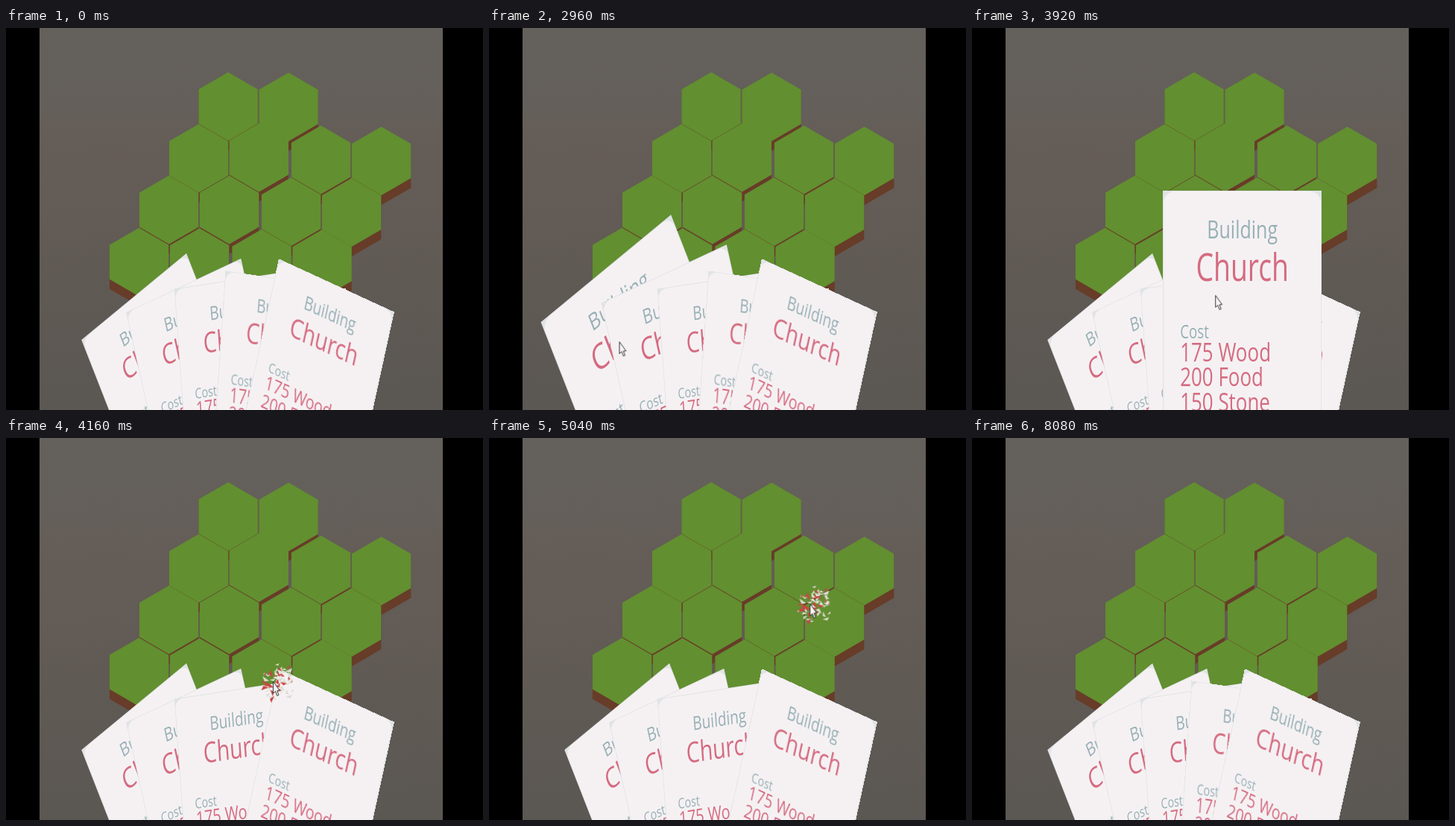
Write an HTML page that moves like this. It is 640 by 512 pixels and loops after 8160 ms.

```html
<!DOCTYPE html>
<html lang="en">
<head>
<meta charset="utf-8">
<title>Card hand over a hex board</title>
<style>
  html, body { margin: 0; width: 100%; height: 100%; overflow: hidden; background: #000; }
  svg { display: block; width: 640px; height: 512px; }
  text { font-family: "Open Sans", "Noto Sans", sans-serif; }
  .label { fill: #97b0b5; }
  .value { fill: #d56b80; }

  .c1, .c2, .c3, .c4, #carry, #arrow, #drag, #church { animation: 8160ms linear infinite; }
  .c1 { animation-name: hover1; }
  .c2 { animation-name: hover2; }
  .c3 { animation-name: hover3; }
  .c4 { animation-name: hover4, away; animation-timing-function: linear, step-end; }
  #carry { animation-name: path; }
  #arrow { animation-name: pointer; animation-timing-function: step-end; }
  #drag { animation-name: drag; animation-timing-function: step-end; }
  #church { animation-name: place; animation-timing-function: step-end; }

  @keyframes hover1 {
    0%, 33% { scale: 1; } 34.3%, 36% { scale: 1.315; } 37.2%, 100% { scale: 1; }
  }
  @keyframes hover2 {
    0%, 36% { scale: 1; } 37%, 38% { scale: 1.315; } 39.1%, 80% { scale: 1; }
    80.6% { scale: 1.315; } 81.3%, 100% { scale: 1; }
  }
  @keyframes hover3 {
    0%, 38% { scale: 1; } 39.2%, 46.3% { scale: 1.315; } 47.1%, 77% { scale: 1; }
    77.8%, 80% { scale: 1.315; } 80.7%, 100% { scale: 1; }
  }
  @keyframes hover4 {
    0%, 46.3% { scale: 1; } 47.1%, 48% { scale: 1.315; } 48.1%, 100% { scale: 1; }
  }
  @keyframes away { 0% { opacity: 1; } 48% { opacity: 0; } 72.5%, 100% { opacity: 1; } }
  @keyframes drag { 0% { opacity: 0; } 48% { opacity: 1; } 50.95%, 100% { opacity: 0; } }
  @keyframes place { 0% { opacity: 0; } 50.95% { opacity: 1; } 72.5%, 100% { opacity: 0; } }
  @keyframes pointer {
    0% { opacity: 0; } 26.45% { opacity: 1; } 27.4% { opacity: 0; }
    31.35% { opacity: 1; } 81.3%, 100% { opacity: 0; }
  }
  @keyframes path {
    0%, 30% { translate: 41px 325px; }
    31.37% { translate: 48px 398px; }
    33.33% { translate: 112px 412px; }
    36.27% { translate: 174px 420px; }
    38.24% { translate: 226px 423px; }
    40.2%, 45.1% { translate: 239.5px 422px; }
    47.06% { translate: 314px 400px; }
    48.04% { translate: 326px 358px; }
    49.02% { translate: 345px 347px; }
    50% { translate: 362px 342px; }
    50.98% { translate: 358px 326px; }
    52.94% { translate: 347px 298px; }
    54.9% { translate: 336px 270px; }
    55.88% { translate: 332px 265px; }
    57.84% { translate: 343px 247px; }
    61.76% { translate: 430px 222px; }
    63.73% { translate: 464px 195px; }
    65.69% { translate: 385px 164px; }
    66.67%, 72.55% { translate: 340px 181px; }
    81.37%, 100% { translate: 215px 525px; }
  }
</style>
</head>
<body>
<svg viewBox="0 0 640 512">
  <defs>
    <linearGradient id="floor" x1="0" y1="0" x2="0" y2="1">
      <stop offset="0" stop-color="#64605b"/>
      <stop offset=".22" stop-color="#645f5a"/>
      <stop offset=".28" stop-color="#655d58"/>
      <stop offset=".5" stop-color="#625b56"/>
      <stop offset="1" stop-color="#5b5752"/>
    </linearGradient>
    <g id="hex">
      <path fill="#673c28" d="M-39.7-23V36L0 59 39.7 36V-23L0 0Z"/>
      <path fill="#628f30" d="M0-46 39.7-23V23L0 46-39.7 23V-23Z"/>
    </g>
    <g id="card">
      <rect x="-81" y="-125" width="162" height="250" fill="#e0e3e5"/>
      <rect x="-80.2" y="-124.4" width="160.4" height="249" rx="11" ry="8" fill="#f5f1f3"/>
      <g transform="scale(1 .93)">
        <g text-anchor="middle">
          <text class="label" y="-98" font-size="19">Building</text>
          <text class="value" y="-66.2" font-size="28.4">Church</text>
        </g>
        <text class="label" x="-63.5" y="-22.6" font-size="14.2">Cost</text>
        <g class="value" font-size="19.7">
          <text x="-63.5" y="-5.4">175 Wood</text>
          <text x="-63.5" y="13.6">200 Food</text>
          <text x="-63.5" y="32.6">150 Stone</text>
        </g>
      </g>
    </g>
  </defs>

  <rect x="45" width="541" height="512" fill="url(#floor)"/>
  <g id="board" transform="translate(-.4 -.7)"></g>
  <g id="hand"></g>

  <g id="carry">
    <g transform="translate(36.5 98.4) scale(1.315 1.907)"><use id="drag" href="#card"/></g>
    <g id="church"></g>
    <path id="arrow" d="M.5.5V16.5L3.6 13.6 5.8 19.6 8 18.7 5.9 12.8H9.4Z"
          fill="#f6f4f5" stroke="#3a3838" stroke-width="1"/>
  </g>

  <path d="M0 0H45V512H0ZM586 0H640V512H586Z"/>
</svg>
<script>
  const NS = "http://www.w3.org/2000/svg";
  function add(parent, tag, attrs) {
    const el = document.createElementNS(NS, tag);
    for (const key in attrs) el.setAttribute(key, attrs[key]);
    return document.getElementById(parent).appendChild(el);
  }

  // Tile centres, back row first
  const tiles = [
    [298.5, 106], [379.5, 106.5],
    [259, 175.5], [339.7, 174.5], [423, 177.5], [504, 179],
    [219, 244.5], [300, 244.5], [383, 247], [464, 248],
    [179, 314.5], [260, 315], [343.5, 316.5], [424.5, 317]
  ];
  for (const [x, y] of tiles) add("board", "use", { href: "#hex", x, y });

  // The view is stretched vertically, so the fan is rotated inside that stretch
  for (let i = 0; i < 5; i++) {
    const slot = add("hand", "g", {
      id: "slot" + i,
      transform: `translate(${233.4 + 43 * i} 517.6) scale(1 1.45) rotate(${-29.6 + 11.8 * i})`
    });
    add(slot.id, "use", { href: "#card", class: "c" + (i + 1) });
  }

  // The church is a heap of small red and white shards
  let seed = 11;
  const rand = () => (seed = (seed * 16807) % 2147483647) / 2147483647;
  function shards(count, fill, spread, size) {
    let d = "";
    for (let i = 0; i < count; i++) {
      const turn = rand() * 6.283, r = spread * Math.sqrt(rand()), lean = rand() * 6.283;
      const x = 7 + r * 0.88 * Math.cos(turn), y = 1 + r * Math.sin(turn);
      const len = size * (0.6 + rand());
      const dx = len * Math.cos(lean), dy = len * Math.sin(lean);
      d += `M${x} ${y}l${dx} ${dy}l${-dy * 0.4 - dx * 0.4} ${dx * 0.4 - dy * 0.4}Z`;
    }
    add("church", "path", { d, fill });
  }
  shards(30, "#d9dccf", 26, 7);
  shards(22, "#c94643", 22, 8);
  shards(9, "#e6e6e0", 18, 6);
</script>
</body>
</html>
```
